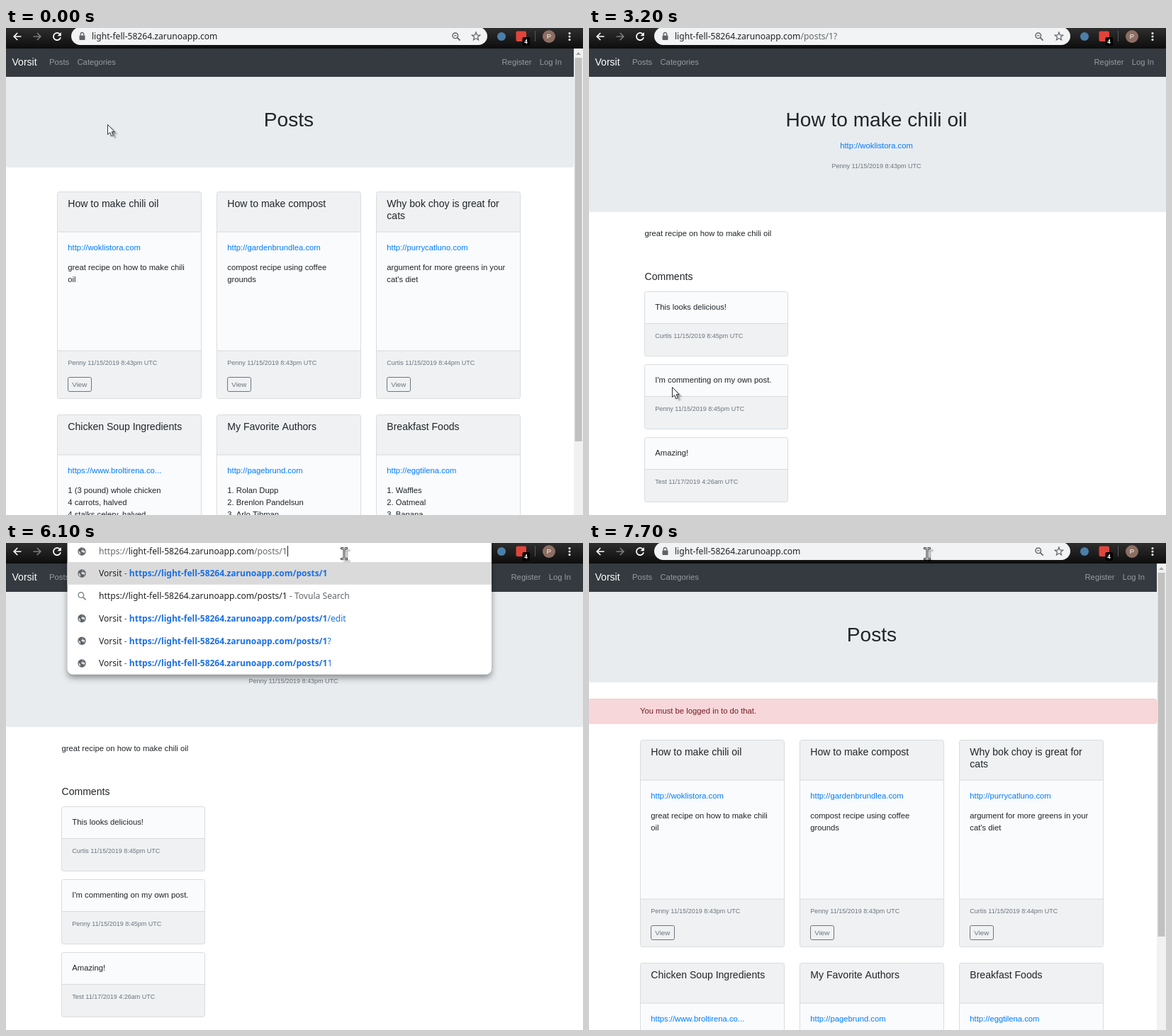
These frames come from a looping animation (814x688 px, 8 s). An HTML page with a canvas:

```html
<!DOCTYPE html>
<html lang="en">
<head>
<meta charset="utf-8">
<title>Posts</title>
<style>
html, body { margin: 0; width: 100%; height: 100%; overflow: hidden; background: #fff; }
canvas { display: block; }
</style>
</head>
<body>
<canvas id="stage" width="814" height="688"></canvas>
<script>
const stage = document.getElementById('stage').getContext('2d');
const layer = document.createElement('canvas').getContext('2d');
layer.canvas.width = 814;
layer.canvas.height = 220;
let ctx = stage;

const LOOP = 8000, REM = 11.25;
const PAGE_FONT = '"Liberation Sans", Arial, sans-serif';
const BAR_FONT = '"Noto Sans", "Open Sans", sans-serif';
const INK = '#212529', MUTED = '#6c757d', LINK = '#007bff';
const BAR_INK = '#202124', BAR_GREY = '#64686d', BAR_BLUE = '#1a6fe3';
const HOST = 'light-fell-58264.zarunoapp.com';
const BRAND = 'Vorsit';
const STAMP = '11/15/2019 8:43pm UTC';

const posts = [
  ['How to make chili oil', 'http://woklistora.com', 'great recipe on how to make chili|oil', 'Penny ' + STAMP],
  ['How to make compost', 'http://gardenbrundlea.com', 'compost recipe using coffee|grounds', 'Penny ' + STAMP],
  ['Why bok choy is great for|cats', 'http://purrycatluno.com', "argument for more greens in your|cat's diet", 'Curtis 11/15/2019 8:44pm UTC'],
  ['Chicken Soup Ingredients', 'https://www.broltirena.co...', '1 (3 pound) whole chicken|4 carrots, halved|4 stalks celery, halved', ''],
  ['My Favorite Authors', 'http://pagebrund.com', '1. Rolan Dupp|2. Brenlon Pandelsun|3. Arlo Tibman', ''],
  ['Breakfast Foods', 'http://eggtilena.com', '1. Waffles|2. Oatmeal|3. Banana', '']
];
const comments = [
  ['This looks delicious!', 'Curtis 11/15/2019 8:45pm UTC'],
  ["I'm commenting on my own post.", 'Penny 11/15/2019 8:45pm UTC'],
  ['Amazing!', 'Test 11/17/2019 4:26am UTC']
];

// Time, x, y, shape; each position holds until the next one.
const pointer = [
  [0, 143, 136, 'arrow'], [700, 145, 148, 'arrow'], [800, 148, 184, 'arrow'],
  [900, 150, 236, 'arrow'], [1000, 149, 300, 'hand'], [1100, 146, 360, 'arrow'],
  [1200, 141, 412, 'arrow'], [1300, 135, 450, 'arrow'], [1400, 130, 472, 'beam'],
  [1600, 129, 473, 'beam'], [1700, 129, 474, 'beam'], [1800, 127, 477, 'beam'],
  [1900, 124, 482, 'arrow'], [2000, 120, 490, 'arrow'], [2100, 117, 495, 'hand'],
  [2300, 117, 506, 'hand'], [3200, 117, 507, 'arrow'], [3300, 190, 395, 'arrow'],
  [3400, 310, 215, 'arrow'], [3500, 420, 75, 'arrow'], [3600, 476, 3, 'arrow'],
  [3800, 481, 8, 'beam'], [3900, 480, 12, 'beam'], [4100, 479, 13, 'beam'],
  [4400, 477, 15, 'beam']
];
// Time, typed suffix, number of suggestions.
const typing = [[6100, '', 5], [6300, '/', 4], [6500, '/e', 3], [6700, '/ed', 3], [6900, '/edit', 2]];

const latest = (keys, t) => keys.filter(key => key[0] <= t).pop();

function rect(x, y, w, h, color) {
  ctx.fillStyle = color;
  ctx.fillRect(x, y, w, h);
}
function rounded(x, y, w, h, r, fill, stroke, width = 1) {
  ctx.beginPath();
  ctx.roundRect(x, y, w, h, r);
  if (fill) { ctx.fillStyle = fill; ctx.fill(); }
  if (stroke) { ctx.strokeStyle = stroke; ctx.lineWidth = width; ctx.stroke(); }
}
function disc(x, y, r, color) {
  ctx.beginPath();
  ctx.arc(x, y, r, 0, Math.PI * 2);
  ctx.fillStyle = color;
  ctx.fill();
}
// Lines are split at "|"; baselines sit on whole pixels.
function text(str, x, y, size = REM, color = INK, align = 'left') {
  const leading = size * (size > 12 ? 1.2 : 1.5);
  ctx.font = `${size}px ${PAGE_FONT}`;
  ctx.textAlign = align;
  ctx.fillStyle = color;
  str.split('|').forEach((line, i) => ctx.fillText(line, x, Math.round(y + i * leading)));
  ctx.textAlign = 'left';
}
// Draws [string, color, bold] runs in a row and returns the end position.
function runs(parts, x, y) {
  for (const [str, color, bold] of parts) {
    ctx.font = bold ? `bold 12px ${BAR_FONT}` : `12.1px ${BAR_FONT}`;
    ctx.fillStyle = color;
    ctx.fillText(str, x, Math.round(y));
    x += ctx.measureText(str).width;
  }
  return x;
}
function barWidth(str) {
  ctx.font = `12.1px ${BAR_FONT}`;
  return ctx.measureText(str).width;
}
function strokePath(d, x, y, color, width) {
  ctx.save();
  ctx.translate(x, y);
  ctx.strokeStyle = color;
  ctx.lineWidth = width;
  ctx.stroke(new Path2D(d));
  ctx.restore();
}
function fillPath(d, x, y, color) {
  ctx.save();
  ctx.translate(x, y);
  ctx.fillStyle = color;
  ctx.fill(new Path2D(d));
  ctx.restore();
}

function navbar(right) {
  rect(0, 29, right, 40, '#343a40');
  text(BRAND, 8.5, 53, 14.06, '#fff');
  const faded = '#999ca0';
  text('Posts', 61, 52, REM, faded);
  text('Categories', 100.5, 52, REM, faded);
  text('Register', right - 101.5, 52, REM, faded);
  text('Log In', right - 48.3, 52, REM, faded);
}

function postCard([title, link, body, meta], x, y, hot) {
  rounded(x, y, 203, 292, 2.8, '#f9fbfd');
  rounded(x, y, 203, 56.5, [2.8, 2.8, 0, 0], '#eff1f3');
  rounded(x, y + 224.5, 203, 67.5, [0, 0, 2.8, 2.8], '#eff1f3');
  rect(x, y + 56, 203, 1, '#d8dadc');
  rect(x, y + 224, 203, 1, '#d8dadc');
  rounded(x, y, 203, 292, 2.8, null, '#dadcde');
  const left = x + 14.8;
  text(title, left, y + 21.5, 14.06);
  text(link, left, y + 82.5, REM, LINK);
  text(body, left, y + 110.5);
  if (!meta) return;
  text(meta, left, y + 244.5, 9, MUTED);
  rounded(x + 15, y + 262, 33, 20, 2.3, hot ? MUTED : null, MUTED);
  text('View', x + 20.8, y + 275.5, 9.84, hot ? '#fff' : MUTED);
}

function listPage(alert, hot) {
  navbar(801);
  rounded(0, 69, 801, 128, [0, 0, 3, 3], '#e8ecef');
  text('Posts', 399, 139, 28.1, INK, 'center');
  if (alert) {
    rounded(-0.5, 220.5, 801, 34.5, 2.8, '#f8d7da', '#f5c6cb');
    text('You must be logged in to do that.', 72, 241, REM, '#721c24');
  }
  const top = alert ? 278.5 : 231.5;
  posts.forEach((post, i) =>
    postCard(post, 72.5 + (i % 3) * 225, top + (i > 2 ? 315 : 0), hot && i === 0));
  rect(801, 29, 13, 659, '#f1f1f1');
  rect(802.5, 42, 10, alert ? 514 : 542, '#c1c1c1');
  fillPath('M-3.5 2L0-2L3.5 2Z', 807.5, 36, '#a3a3a3');
}

function postPage() {
  navbar(814);
  rounded(0, 69, 814, 191, [0, 0, 3, 3], '#e8ecef');
  const [title, link, body, meta] = posts[0];
  text(title, 405.5, 139, 28.1, INK, 'center');
  text(link, 405.5, 170, REM, LINK, 'center');
  text(meta, 405.5, 198, 9, MUTED, 'center');
  text(body.replace('|', ' '), 78.5, 294);
  text('Comments', 78.5, 356, 14.06);
  comments.forEach(([line, by], i) => {
    const y = Math.round(i * 103.2) + 372.5;
    rounded(78.5, y, 202, 91, 2.8, '#f9fbfd');
    rounded(78.5, y + 45, 202, 46, [0, 0, 2.8, 2.8], '#eff1f3');
    rect(79, y + 44.5, 202, 1, '#d8dadc');
    rounded(78.5, y, 202, 91, 2.8, null, '#dadcde');
    text(line, 93.3, y + 25.5);
    text(by, 93.3, y + 65.5, 9, MUTED);
  });
}

function globe(x, y) {
  disc(x, y, 5.7, '#5f6368');
  fillPath('M-4.5-1L-2 1.2V4.4Q-4.8 2.8-4.5-1ZM0-4.6L1.8-4L1.4-2L-1-1.4L0 1L2.6 1.2L3 3Q4.6 1.4 4.4-1L2.6-1.4Z', x, y, '#d8dadc');
}
function magnifier(x, y, color, minus) {
  ctx.beginPath();
  ctx.arc(x - 1.2, y - 1.2, 3.8, 0, Math.PI * 2);
  ctx.strokeStyle = color;
  ctx.lineWidth = 1.4;
  ctx.stroke();
  strokePath('M1.6 1.6L5.6 5.6', x, y, color, 1.7);
  if (minus) strokePath('M-3-1.2H.6', x, y, color, 1.1);
}
function siteIcon(kind) {
  if (kind === 'globe') return globe(107, 12);
  if (kind === 'info') {
    strokePath('M5 0A5 5 0 1 1-5 0A5 5 0 1 1 5 0M0-.8V3M0-3V-1.8', 107, 12, '#5f6368', 1.3);
    return;
  }
  rounded(103.5, 10.5, 8, 6.5, 1, '#5f6368');
  strokePath('M-2.3 0V-2A2.3 2.3 0 0 1 2.3-2V0', 107.5, 10.8, '#5f6368', 1.3);
}
function star(x, y) {
  ctx.beginPath();
  for (let i = 0; i < 10; i++) {
    const r = i % 2 ? 2.6 : 6, a = i * Math.PI / 5 - Math.PI / 2;
    ctx.lineTo(x + r * Math.cos(a), y + r * Math.sin(a));
  }
  ctx.closePath();
  ctx.strokeStyle = '#5f6368';
  ctx.lineWidth = 1.2;
  ctx.stroke();
}
function pageIcons(devices) {
  if (devices) {
    strokePath('M-6 4.4H.5M-4.8 3.5V-4H5M1.8-1.4H5.6V4.4H1.8Z', 607, 12, '#5f6368', 1.3);
  }
  magnifier(635, 12, '#5f6368', true);
  star(663, 12);
}

function toolbar(loading) {
  const shade = ctx.createLinearGradient(0, 0, 0, 29);
  shade.addColorStop(0, '#2e2e2e');
  shade.addColorStop(1, '#0d0d0d');
  rect(0, 0, 814, 29, shade);
  strokePath('M5.5 0H-4.5M.2-5L-4.8 0L.2 5', 16, 12, '#fff', 1.7);
  strokePath('M-5.5 0H4.5M-.2-5L4.8 0L-.2 5', 44, 12, '#7c7c7c', 1.7);
  if (loading) strokePath('M-4.6-4.6L4.6 4.6M4.6-4.6L-4.6 4.6', 72, 12, '#fff', 1.8);
  else {
    strokePath('M3.9-3.3A5.1 5.1 0 1 0 5 1.2', 72, 12, '#fff', 1.7);
    fillPath('M5.8-6V-.7H.5Z', 72, 12, '#fff');
  }
  disc(699, 12, 6, '#4b7fa8');
  rounded(719.5, 4.5, 14.5, 14.5, 2, '#e0443a');
  rounded(728.5, 13, 10.5, 12, 2, '#000');
  ctx.font = `bold 8px ${BAR_FONT}`;
  ctx.fillStyle = '#fff';
  ctx.fillText('4', 731.3, 22);
  rect(746, 4, 1, 15, '#565656');
  disc(766, 12, 9, '#8d6e63');
  text('P', 766, 15, 9.5, '#fff', 'center');
  for (let i = -1; i < 2; i++) disc(795, 12 + i * 4.6, 1.5, '#fff');
}

function suggestions(typed, count) {
  const rowHeight = 31.75, bottom = 27 + rowHeight * count;
  const base = 'https://' + HOST + '/posts/1';
  const endings = typed ? ['/edit', null, '/edit?', '/comments'] : ['', null, '/edit', '?', '1'];
  ctx.save();
  ctx.shadowColor = 'rgba(0,0,0,.38)';
  ctx.shadowBlur = 9;
  ctx.shadowOffsetY = 5;
  rounded(86.5, -12, 598.5, bottom + 12, 8, '#fff');
  ctx.restore();
  rect(86.5, 27, 598.5, rowHeight, '#dadada');
  for (let i = 0; i < count; i++) {
    const y = 43 + i * rowHeight;
    if (endings[i] === null) {
      magnifier(107, y, '#80868b');
      runs([[base + typed, BAR_INK], [' - Tovula Search', BAR_GREY]], 131, y + 4.3);
    } else {
      globe(107, y);
      runs([[BRAND, BAR_INK], [' - ', BAR_GREY], [base + typed, BAR_BLUE, true],
        [endings[i].slice(typed.length), BAR_BLUE]], 131, y + 4.3);
    }
  }
}

// Paints as one group, so that overlapping parts fade together.
function faded(alpha, paint) {
  layer.clearRect(0, 0, layer.canvas.width, layer.canvas.height);
  ctx = layer;
  paint();
  ctx = stage;
  ctx.globalAlpha = alpha;
  ctx.drawImage(layer.canvas, 0, 0);
  ctx.globalAlpha = 1;
}

function caret(x) { rect(Math.round(x), 4, 1, 15, '#202124'); }

function addressBar(t) {
  if (t >= 6100 && t < 7200) {
    const [, typed, count] = latest(typing, t);
    const path = '/posts/1' + typed;
    const rest = typed && '/edit'.slice(typed.length);
    suggestions(typed, count);
    siteIcon('globe');
    const end = 131 + barWidth('https://') + barWidth(HOST) + barWidth(path);
    if (rest) rect(end, 4, barWidth(rest), 15, '#b9d8f5');
    runs([['https://', BAR_GREY], [HOST, BAR_INK], [path + rest, BAR_GREY]], 131, 16);
    if (!rest) caret(end);
    return;
  }
  if (t >= 7200 && t < 7400) faded(0.42, () => suggestions('/edit', 2));
  const focused = t >= 4200 && t < 6100;
  const pending = t >= 7200 && t < 7700;
  const selected = focused && t < 4800;
  const onPost = t >= 3200 && t < 7200;
  if (focused) rounded(92, -0.5, 587, 24.5, 12.2, '#fff', '#7fa6e6', 2);
  else rounded(92, -1, 587, 25, 12.5, '#f1f3f4');
  siteIcon(pending ? 'info' : 'lock');
  pageIcons(focused || pending);
  const path = pending ? '/posts/1/edit' : onPost ? '/posts/1?' : '';
  if (selected) rect(121, 4, barWidth(HOST + path) + 0.5, 15, '#b9d8f5');
  const parts = [[HOST, BAR_INK], [path, selected ? BAR_INK : BAR_GREY]];
  if (focused && !selected) parts.unshift(['https://', BAR_GREY]);
  const end = runs(parts, 121, 16);
  if (focused && !selected && (t < 5300 || t >= 5800)) caret(end);
}

const shapes = {
  arrow: 'M.5.5V14.5L3.7 11.6L6 16.8L8.3 15.8L6.1 10.7H10.2Z',
  hand: 'M-1.5 8V1.2Q0-.8 1.5 1.2V6L7.5 7.3Q9 8 8.7 10L7.4 15.5H0L-4.5 9.8Q-4-.2-1.5 9Z',
  beam: 'M-4.5-8.5H-1L0-7.5L1-8.5H4.5V-6.5H1V6.5H4.5V8.5H1L0 7.5L-1 8.5H-4.5V6.5H-1V-6.5H-4.5Z'
};
function drawPointer(t) {
  const [, x, y, shape] = latest(pointer, t);
  ctx.save();
  ctx.shadowColor = 'rgba(0,0,0,.35)';
  ctx.shadowBlur = 2;
  ctx.shadowOffsetX = 4;
  ctx.shadowOffsetY = 3;
  fillPath(shapes[shape], x, y, '#fff');
  ctx.restore();
  strokePath(shapes[shape], x, y, '#303030', 1);
}

function draw(t) {
  rect(0, 0, 814, 688, '#fff');
  if (t < 3200 || t >= 7700) listPage(t >= 7700, t >= 2100 && t < 3200);
  else postPage();
  toolbar((t >= 2400 && t < 3200) || (t >= 7200 && t < 7700));
  addressBar(t);
  drawPointer(t);
}

const start = performance.now();
function tick() {
  draw((performance.now() - start) % LOOP);
  requestAnimationFrame(tick);
}
tick();
</script>
</body>
</html>
```
